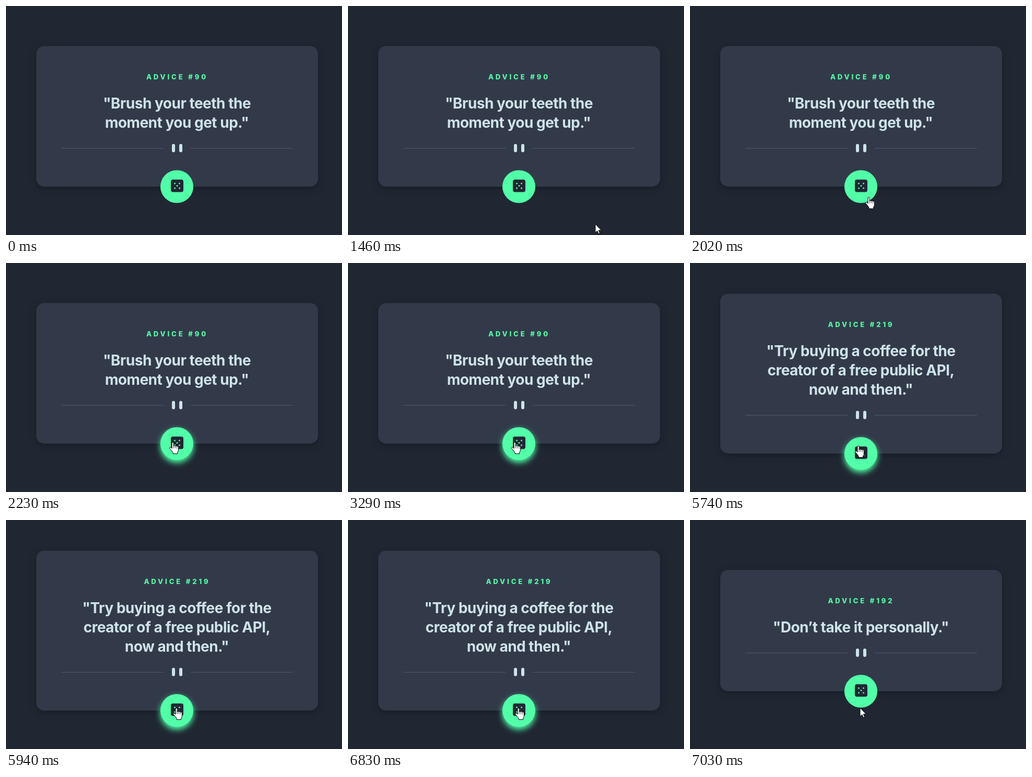
Recreate the animation shown at these times as an HTML page. Size 644 px wide and 440 px high, loop 8000 ms.

```html
<!DOCTYPE html>
<html lang="en">
<head>
<meta charset="utf-8">
<title>Advice card</title>
<style>
  html, body { margin: 0; width: 100%; height: 100%; overflow: hidden; background: #202733; }
  svg { display: block; width: 644px; height: 440px; }
  text { font-family: Inter, "Open Sans", sans-serif; text-anchor: middle; }
  .label { font-size: 13px; font-weight: 800; letter-spacing: 3.9px; fill: #52ffa8; }
  .quote { font-size: 28px; font-weight: 700; letter-spacing: -.5px; fill: #cee3e9; }
  .card { fill: #323a49; filter: drop-shadow(0 4px 7px rgba(0, 0, 0, .25)); }
  .rule { fill: #4f5a6b; }
  .bar { fill: #cee3e9; }
  .button, .dots { fill: #52ffa8; }
  .glow { fill: #52ffa8; filter: blur(6px); }
  .die { fill: #202733; }
  .pointer { fill: #fff; stroke: #000; stroke-linejoin: round; }
  .press { fill: rgba(255, 255, 0, .47); }
</style>
</head>
<body>
<svg viewBox="0 0 644 440">
  <g id="scene"></g>
  <g id="cursor">
    <path id="arrow" class="pointer" d="M0 0V16.5L3.7 13 6.2 18.5 8.7 17.5 6.3 12H11.5Z"/>
    <g id="hand" class="pointer">
      <path d="M-1 2a1.6 1.6 0 0 1 3.2 0V8a1.6 1.4 0 0 1 3.2 .4a1.6 1.4 0 0 1 3.2 .6a1.4 1.4 0 0 1 2.8 .8V15q0 2.5-1.8 5V22.5H1.2V21q-1-2.5-3.2-5L-5.3 12.2c-.9-1.8 1.3-2.8 2.6-1.6L-1 12.3Z"/>
      <path d="M2.2 8v4M5.4 9v3M8.6 9.5v3" stroke-width=".8"/>
    </g>
    <circle id="press" class="press" r="12"/>
  </g>
</svg>
<script>
const LOOP = 8000, BUTTON_X = 327.5, RADIUS = 31.6;
const $ = id => document.getElementById(id);

const cards = [
  { start: 0, top: 77, bottom: 347, number: 90,
    lines: ['"Brush your teeth the', 'moment you get up."'] },
  { start: 3890, top: 59, bottom: 366, number: 219,
    lines: ['"Try buying a coffee for the', 'creator of a free public API,', 'now and then."'] },
  { start: 7030, top: 96, bottom: 329, number: 192,
    lines: ['"Don’t take it personally."'] }
];

// The pointer was sampled about 15 times a second, so it moves in steps.
const linear = p => p, easeOut = p => 1 - (1 - p) ** 2;
const moves = [
  { start: 1320, end: 2020, steps: 10, from: [507, 432], to: [342, 367], ease: linear },
  { start: 2020, end: 2230, steps: 3, from: [342, 367], to: [319, 344], ease: easeOut },
  { start: 5673, end: 5940, steps: 4, from: [319, 344], to: [326, 361], ease: easeOut }
];
const presses = [[3160, 3290], [6700, 6830]];

const latest = (list, t) => list.filter(item => t >= item.start).pop();
const show = (el, on) => el.setAttribute('visibility', on ? 'visible' : 'hidden');

function drawCard({ top, bottom, number, lines }) {
  const ruleY = bottom - 74, dieY = bottom - 1.5;
  const dot = (dx, dy) => `<circle cx="${328 + dx}" cy="${dieY + dy}" r="1.5"/>`;
  $('scene').innerHTML = `
    <rect class="card" x="58" y="${top}" width="540" height="${bottom - top}" rx="15"/>
    <text class="label" x="328" y="${top + 64}">ADVICE #${number}</text>
    ${lines.map((line, i) =>
      `<text class="quote" x="327.5" y="${top + 120 + 37 * i}">${line}</text>`).join('')}
    ${[106, 354].map(x => `<rect class="rule" x="${x}" y="${ruleY}" width="196" height="1"/>`).join('')}
    ${[318, 332].map(x => `<rect class="bar" x="${x}" y="${ruleY - 8}" width="6" height="16" rx="3"/>`).join('')}
    <circle id="glow" class="glow" cx="${BUTTON_X}" cy="${bottom + 5}" r="${RADIUS}"/>
    <circle class="button" cx="${BUTTON_X}" cy="${bottom}" r="${RADIUS}"/>
    <rect class="die" x="316" y="${dieY - 12}" width="24" height="24" rx="4"/>
    <g class="dots">${dot(0, 0)}${dot(-4.5, -4.5)}${dot(4.5, -4.5)}${dot(-4.5, 4.5)}${dot(4.5, 4.5)}</g>`;
}

function pointerAt(t) {
  const move = latest(moves, t);
  if (!move) return null;
  const { start, end, steps, from, to, ease } = move;
  const step = Math.floor((t - start) / (end - start) * steps + 1e-6);
  const p = ease(Math.min(1, step / steps));
  return from.map((v, i) => Math.round(v + (to[i] - v) * p));
}

let current;
function render(t) {
  const card = latest(cards, t);
  if (card !== current) drawCard(current = card);

  const tip = pointerAt(t);
  const hover = !!tip && Math.hypot(tip[0] - BUTTON_X, tip[1] - card.bottom) < RADIUS;
  if (tip) $('cursor').setAttribute('transform', `translate(${tip[0]} ${tip[1]})`);
  show($('arrow'), tip && !hover);
  show($('hand'), hover);
  show($('glow'), hover && t >= 2090);
  show($('press'), presses.some(([a, b]) => t >= a && t < b));
}

const origin = performance.now();
function tick() {
  render((performance.now() - origin) % LOOP);
  requestAnimationFrame(tick);
}
tick();
</script>
</body>
</html>
```
